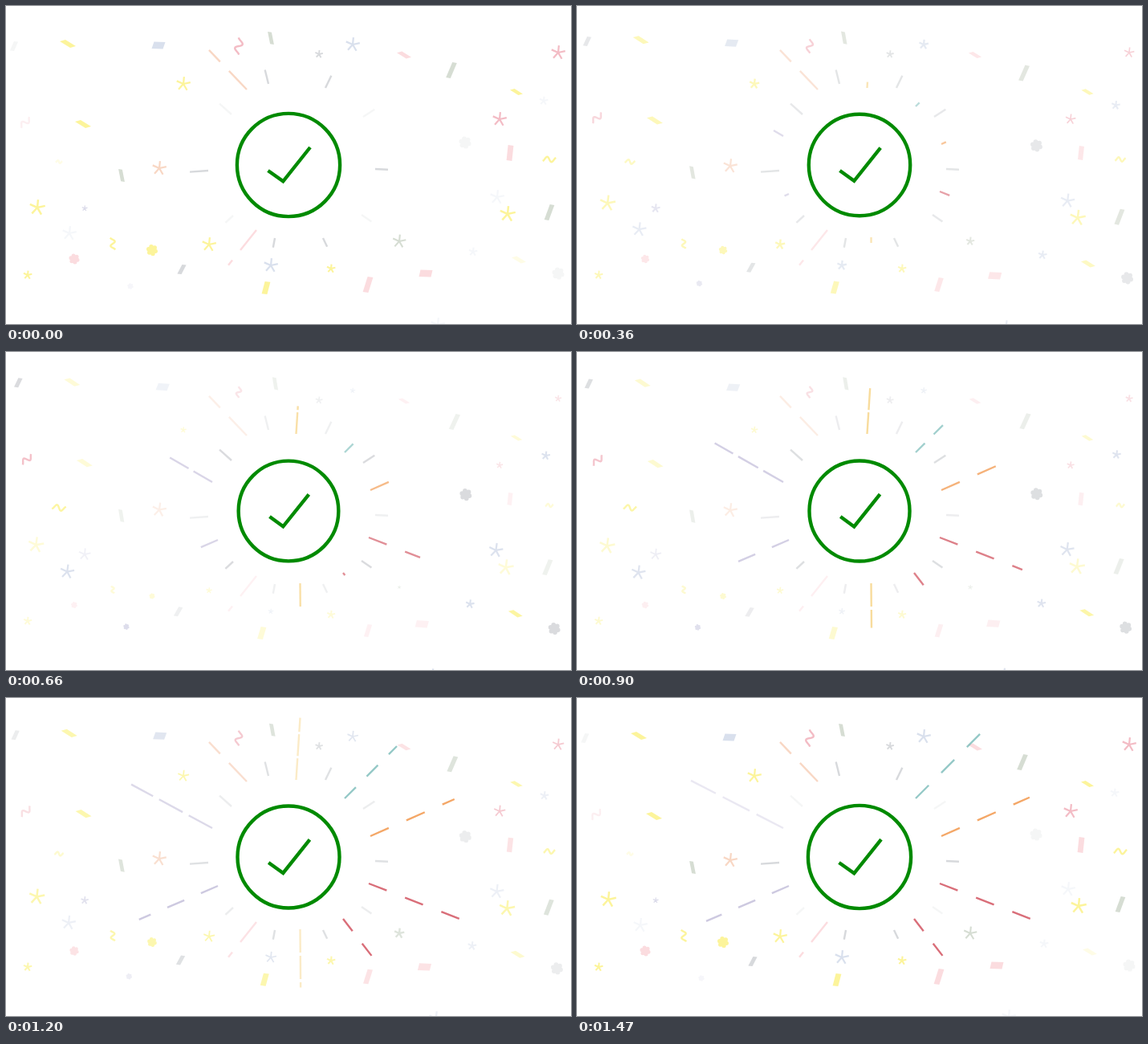
Animation, 704 px wide and 396 px high, one loop 1500 ms. Source, as an HTML page with a canvas:

```html
<!DOCTYPE html>
<html lang="en">
<head>
<meta charset="utf-8">
<title>Success</title>
<style>
html, body { margin: 0; width: 100%; height: 100%; overflow: hidden; background: #fff; }
canvas { display: block; width: 704px; height: 396px; }
</style>
</head>
<body>
<canvas id="stage" width="704" height="396"></canvas>
<script>
const ctx = document.getElementById("stage").getContext("2d");
const LOOP = 1500, STEP = 30, PEAK = 720, SWIRL = .035;
const HUB = { x: 352, y: 198 };

// Each colour carries its strongest opacity
const YELLOW = "rgba(248,233,46,.48)", GREY = "rgba(108,115,124,.27)", BLUE = "rgba(120,144,189,.28)",
  PURPLE = "rgba(124,124,180,.28)", PINK = "rgba(243,138,150,.3)", RED = "rgba(220,64,88,.35)",
  PEACH = "rgba(236,149,100,.38)", MOSS = "rgba(104,128,92,.27)";
const GOLD = "rgba(242,189,69,.6)", LILAC = "rgba(170,162,202,.58)", TEAL = "rgba(105,179,176,.7)",
  ORANGE = "rgba(240,138,52,.75)", CRIMSON = "rgba(204,62,76,.75)";

// Opacity at rest and at the far end of the swirl
const LEAVE = [1, .38], ARRIVE = [.25, .95];

const mix = (a, b, k) => a + (b - a) * k;
const progress = (t, start, duration) => Math.max(0, Math.min(1, (t - start) / duration));
const smooth = p => p * p * (3 - 2 * p);

function polygon(...points) {
  ctx.beginPath();
  points.forEach(([x, y]) => ctx.lineTo(x, y));
  ctx.fill();
}

function star(size) {
  ctx.beginPath();
  for (let i = 0; i < 5; i++) {
    const a = i * Math.PI * .4 - 1.47;
    ctx.moveTo(0, 0);
    ctx.lineTo(size * Math.cos(a), size * Math.sin(a));
  }
  ctx.lineWidth = Math.max(1, size * (size < 6.5 ? .38 : .25));
  ctx.stroke();
}

function flower(size) {
  ctx.beginPath();
  ctx.arc(0, 0, size * .4, 0, 7);
  for (let i = 0; i < 6; i++) {
    const a = i * Math.PI / 3 + .3, x = size * .6 * Math.cos(a), y = size * .6 * Math.sin(a);
    ctx.moveTo(x + size * .36, y);
    ctx.arc(x, y, size * .36, 0, 7);
  }
  ctx.fill();
}

function sliver(size) {
  const w = size, h = size / 2;
  polygon([-w, -h * .6], [-w * .3, -h], [w, h * .6], [w * .3, h]);
}

const ribbon = w => (h, lean) =>
  polygon([lean - w, -h], [lean + w, -h * .9], [w - lean, h], [-w - lean, h * .9]);

function wave(size, tilt) {
  ctx.rotate(tilt);
  ctx.beginPath();
  for (let p = -1; p <= 1; p += .1) ctx.lineTo(size * p, size * .38 * Math.sin(p * 4.4));
  ctx.lineWidth = 2.4;
  ctx.stroke();
}

// Pieces that keep their size swirl round the hub; the others scale in place
const pieces = [];
function scatter(shape, size, color, fade, end, ...places) {
  for (const [x, y, slant = 0] of places) pieces.push({ shape, size, color, fade, end, x, y, slant });
}

scatter(star, 9, YELLOW, LEAVE, .4, [221, 97], [253, 297]);
scatter(star, 9, BLUE, LEAVE, .35, [432, 48], [330, 323]);
scatter(star, 9, RED, LEAVE, .45, [688, 58], [615, 141]);
scatter(star, 8.5, MOSS, LEAVE, .25, [490, 293]);
scatter(star, 5, GREY, LEAVE, .9, [390, 60]);
scatter(star, 3.5, PURPLE, LEAVE, 2.2, [98, 252]);
scatter(star, 9, PEACH, LEAVE, 1, [191, 202]);
scatter(star, 10, YELLOW, LEAVE, 1, [39, 251], [625, 259]);
scatter(star, 5.5, YELLOW, LEAVE, .95, [405, 327], [27, 335]);
scatter(star, 9, BLUE, ARRIVE, 1, [79, 283], [612, 238], [538, 397]);
scatter(star, 5.5, BLUE, ARRIVE, 1, [582, 306], [670, 118]);
scatter(flower, 7.5, YELLOW, LEAVE, .5, [182, 304]);
scatter(flower, 7, PINK, LEAVE, .6, [85, 315]);
scatter(flower, 8, GREY, ARRIVE, 1, [572, 170], [688, 333]);
scatter(flower, 4, PURPLE, ARRIVE, 1, [155, 349]);

scatter(sliver, 10, YELLOW, LEAVE, 1, [96, 147], [77, 47]);
scatter(sliver, 8, YELLOW, LEAVE, .9, [636, 107]);
scatter(sliver, 9, YELLOW, ARRIVE, 1, [639, 316]);
scatter(sliver, 9, PINK, LEAVE, .8, [496, 61]);
scatter(ribbon(2.4), 8, MOSS, LEAVE, 1, [330, 40, -1.5], [144, 211, -1.5]);
scatter(ribbon(2.8), 10, MOSS, LEAVE, 1, [555, 80, 4], [677, 257, 3.5]);
scatter(ribbon(2.6), 6, GREY, LEAVE, 1, [219, 328, 3]);
scatter(ribbon(2.6), 6, GREY, ARRIVE, 1, [10, 50, 2.5]);
scatter(ribbon(3.4), 8, YELLOW, LEAVE, 1, [324, 351, 2]);
scatter(ribbon(3.4), 10, PINK, LEAVE, .8, [451, 347, 3], [628, 183, 1]);
scatter(ribbon(7), 4.5, BLUE, LEAVE, 1, [190, 49, 1.5]);
scatter(ribbon(7.5), 4.5, PINK, LEAVE, 1, [523, 333, 1]);

scatter(wave, 10, RED, LEAVE, .65, [290, 50, 1.9]);
scatter(wave, 7.5, YELLOW, LEAVE, .6, [133, 296, 1.5]);
scatter(wave, 8, RED, ARRIVE, 1, [24, 145, -.6]);
scatter(wave, 4, YELLOW, ARRIVE, 2.1, [66, 194, .2]);
scatter(wave, 8, YELLOW, LEAVE, .6, [677, 191, .1]);

function drawPiece({ shape, size, color, fade, end, x, y, slant }, k) {
  ctx.save();
  if (end === 1) {
    ctx.translate(HUB.x, HUB.y);
    ctx.rotate(SWIRL * k);
    ctx.translate(-HUB.x, -HUB.y);
  }
  ctx.translate(x, y);
  ctx.globalAlpha = mix(...fade, k);
  ctx.fillStyle = ctx.strokeStyle = color;
  const scale = mix(1, end, k);
  if (shape === star || shape === flower || shape === wave) {
    shape(size * scale, slant);
  } else {
    ctx.scale(scale, scale);
    shape(size, slant);
  }
  ctx.restore();
}

function drawRay(x, y, angle, length, color, alpha, dash = length, gap = 0) {
  ctx.globalAlpha = alpha;
  ctx.strokeStyle = color;
  ctx.lineWidth = 2.4;
  ctx.setLineDash(gap ? [dash, gap] : []);
  ctx.beginPath();
  ctx.moveTo(x, y);
  ctx.lineTo(x + length * Math.cos(angle), y + length * Math.sin(angle));
  ctx.stroke();
  ctx.setLineDash([]);
}

function drawStillRays(k) {
  const radial = (fade, ...rays) => rays.forEach(([x, y, length]) =>
    drawRay(x, y, Math.atan2(y - HUB.y, x - HUB.x), length, GREY, mix(...fade, k)));
  radial(LEAVE, [327, 97, 18], [398, 102, 17], [252, 205, 23], [460, 203, 16], [335, 289, 12], [395, 289, 12]);
  radial(ARRIVE, [281, 135, 20], [445, 138, 17], [283, 261, 13], [443, 260, 15]);
  drawRay(300, 104, -2.335, 68, PEACH, mix(...LEAVE, k), 32, 16);
  drawRay(312, 279, 2.245, 56, PINK, mix(...LEAVE, k), 32, 16);
}

// stretch and turn act late in the loop; fadeTo is the opacity left at its end
const growing = [
  { x: 361.5, y: 102, angle: -86.3, reach: 78, dash: 27, gap: 3, color: GOLD, start: 150, duration: 1100, fadeTo: 0 },
  { x: 366.5, y: 288, angle: 89.5, reach: 73, dash: 29, gap: 4, color: GOLD, start: 150, duration: 1100, fadeTo: 0 },
  { x: 257, y: 162, angle: 210, reach: 93, dash: 27, gap: 7, color: LILAC, start: 180, duration: 740,
    stretch: 1.39, turn: -2.8, fadeTo: .42 },
  { x: 264, y: 234, angle: 156.9, reach: 112, dash: 23, gap: 22.5, color: LILAC, start: 200, duration: 1150 },
  { x: 422, y: 125, angle: -45, reach: 74, dash: 15, gap: 14.5, color: TEAL, start: 130, duration: 1250, stretch: 1.53 },
  { x: 454, y: 172, angle: -23.7, reach: 120, dash: 25, gap: 24, color: ORANGE, start: 200, duration: 1150 },
  { x: 452, y: 231, angle: 21.3, reach: 121, dash: 24, gap: 24.5, color: CRIMSON, start: 180, duration: 880 },
  { x: 420, y: 275, angle: 52.3, reach: 58, dash: 19.2, gap: 19.6, color: CRIMSON, start: 560, duration: 640 }
];

function drawGrowingRay({ x, y, angle, reach, dash, gap, color, start, duration, stretch = 1, turn = 0, fadeTo = 1 }, t) {
  const late = progress(t, 800, 670);
  const scale = mix(1, stretch, late);
  const length = reach * scale * smooth(progress(t, start, duration));
  if (!length) return;
  const alpha = mix(.5, 1, progress(t, 0, 1200)) * mix(1, fadeTo, progress(t, 950, 500));
  drawRay(x, y, (angle + turn * late) * Math.PI / 180, length, color, alpha, dash * scale, gap * scale);
}

function drawBadge(k) {
  ctx.globalAlpha = 1;
  ctx.strokeStyle = "#008a00";
  ctx.lineWidth = 4.4;
  ctx.beginPath();
  ctx.arc(HUB.x, HUB.y, mix(64.1, 62.3, k), 0, Math.PI * 2);
  ctx.stroke();
  ctx.beginPath();
  ctx.moveTo(mix(326.5, 328.5, k), 205);
  ctx.lineTo(345.3, mix(218.3, 217.3, k));
  ctx.lineTo(mix(379, 377.3, k), mix(176, 177.3, k));
  ctx.stroke();
}

function frame(now) {
  const t = Math.floor(now % LOOP / STEP) * STEP;
  const phase = t < PEAK ? t / PEAK : (LOOP - t) / (LOOP - PEAK);
  const k = (1 - Math.cos(Math.PI * phase)) / 2;
  ctx.globalAlpha = 1;
  ctx.fillStyle = "#fff";
  ctx.fillRect(0, 0, 704, 396);
  pieces.forEach(piece => drawPiece(piece, k));
  drawStillRays(k);
  growing.forEach(ray => drawGrowingRay(ray, t));
  drawBadge(k);
}

const start = performance.now();
function tick() {
  frame(performance.now() - start);
  requestAnimationFrame(tick);
}
tick();
</script>
</body>
</html>
```
